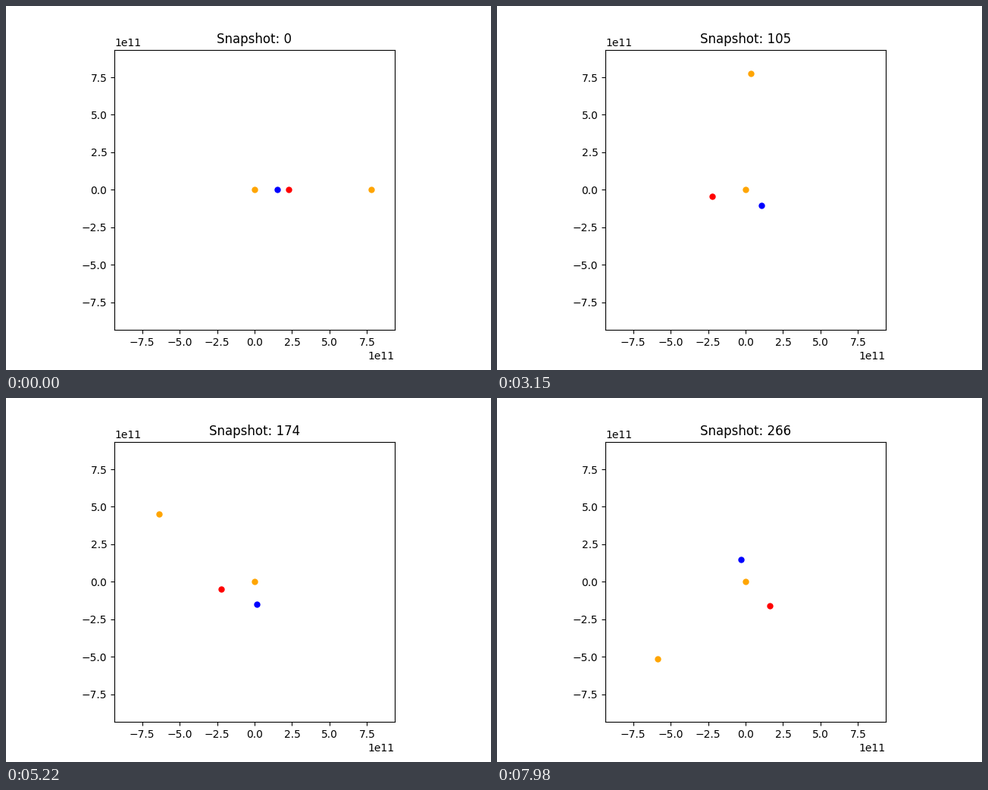
Animation of 640x480 px, one loop 8 s. Source, as a matplotlib script:

```python
import numpy as np
import matplotlib.pyplot as plt
from matplotlib.animation import FuncAnimation

LOOP_MS = 8000
TICK_MS = 20
SNAPSHOT_MS = 30
DAYS_PER_SNAPSHOT = 10

# orbit radius in m, degrees per day, colour
BODIES = [
    (0.0, 0.0, "orange"),
    (1.496e11, 0.9856, "blue"),
    (2.279e11, 0.5243, "red"),
    (7.785e11, 0.08315, "orange"),
]
LIMIT = 1.2 * BODIES[-1][0]

fig, ax = plt.subplots(figsize=(6.4, 4.8), dpi=100)
ax.set_aspect("equal")
ax.set_xlim(-LIMIT, LIMIT)
ax.set_ylim(-LIMIT, LIMIT)
title = ax.set_title("Snapshot: 0")
dots = [ax.plot([r], [0], "o", color=color, markersize=5)[0]
        for r, _, color in BODIES]


def update(i):
    # nearest snapshot on the finer timer grid
    snapshot = (i * TICK_MS + TICK_MS // 2) // SNAPSHOT_MS
    days = snapshot * DAYS_PER_SNAPSHOT
    for dot, (radius, rate, _) in zip(dots, BODIES):
        angle = np.radians(rate * days)
        dot.set_data([radius * np.cos(angle)], [radius * np.sin(angle)])
    title.set_text(f"Snapshot: {snapshot}")
    return [*dots, title]


anim = FuncAnimation(fig, update, frames=LOOP_MS // TICK_MS,
                     interval=TICK_MS, repeat=True, repeat_delay=0)
plt.show()
```
